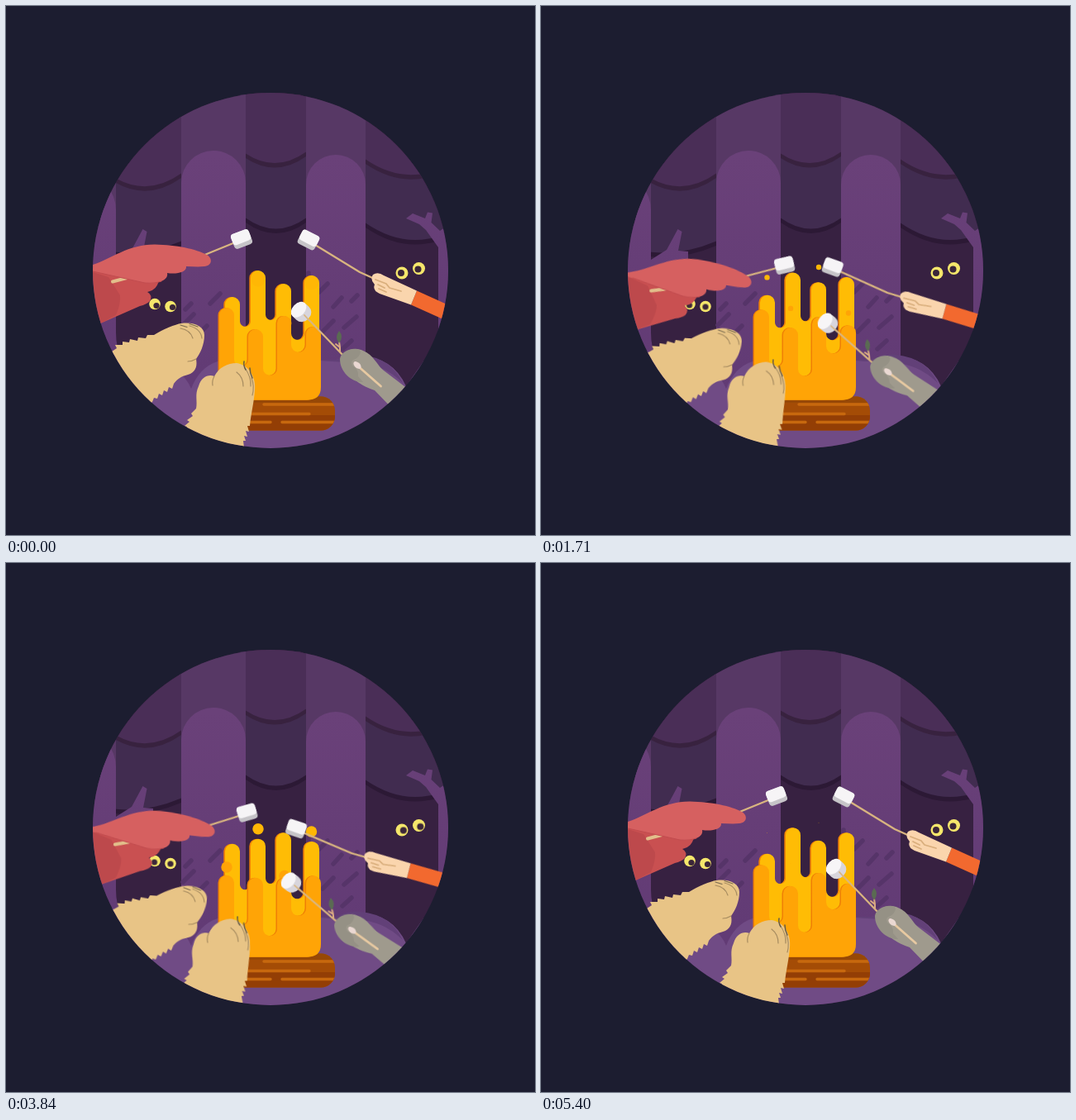
Write an HTML page that moves like this. It is 640x640 px and loops after 5430 ms.

```html
<!DOCTYPE html>
<html lang="en">
<head>
<meta charset="utf-8">
<title>Campfire</title>
<style>
html, body { margin: 0; width: 100%; height: 100%; overflow: hidden; background: #1c1d30; }
svg { display: block; width: 100%; height: 100%; }

.swing { animation: 5430ms cubic-bezier(.37, 0, .63, 1) infinite; }
#red { transform-origin: 46px 372px; animation-name: red; }
#human { transform-origin: 622px 405px; animation-name: human; }
#grey { transform-origin: 524px 505px; animation-name: grey; }
@keyframes red { 38.67%, 47.33% { transform: rotate(8.1deg); } }
@keyframes human { 41.99%, 69.43% { transform: rotate(-8.4deg); } }
@keyframes grey {
  0%, 8.84%, 98.9%, 100% { transform: rotate(0deg); }
  47.7%, 57.09% { transform: rotate(-7.2deg); }
}

.paw { animation: paw 1357.5ms cubic-bezier(.37, 0, .63, 1) infinite alternate; }
#bigPaw { --turn: 4deg; transform-origin: 110px 450px; }
#smallPaw { --turn: -3.7deg; transform-origin: 250px 560px; }
@keyframes paw { to { transform: rotate(var(--turn)); } }

.look { animation: 5430ms ease-in-out infinite; }
#lookLeft { animation-name: lookLeft; }
#lookRight { animation-name: lookRight; }
@keyframes lookLeft {
  0%, 23%, 98%, 100% { transform: translate(2px, 1px); }
  27%, 94% { transform: translate(-.5px, .5px); }
}
@keyframes lookRight {
  0%, 61%, 96%, 100% { transform: translate(-1px, 0); }
  65%, 92% { transform: translate(1.8px, .5px); }
}
.line { fill: none; stroke-linecap: round; stroke-linejoin: round; }
.stick { stroke: #d9b57f; stroke-width: 2.2; }
</style>
</head>
<body>
<svg viewBox="0 0 640 640">
  <defs>
    <clipPath id="porthole"><circle cx="320" cy="320" r="215"/></clipPath>
    <linearGradient id="bark" gradientUnits="userSpaceOnUse" x1="0" y1="180" x2="0" y2="440">
      <stop stop-color="#6a4179"/><stop offset="1" stop-color="#623b75"/>
    </linearGradient>
    <clipPath id="logShape"><rect x="240" y="472.500" width="158" height="41" rx="17"/></clipPath>
    <g id="mallow">
      <rect x="-11.500" y="-9.500" width="23" height="19" rx="4" fill="#c6c4c8"/>
      <rect x="-11.500" y="-9.500" width="23" height="14" rx="4" fill="#f6f4f6"/>
    </g>
  </defs>

  <rect width="640" height="640" fill="#1c1d30"/>
  <g clip-path="url(#porthole)">
    <rect x="105" y="105" width="430" height="430" fill="#372141"/>
    <g id="leaves"></g>

    <!-- trunks -->
    <path fill="#573865" d="M212 100H290V260H212ZM363 100H435V260H363ZM90 100H133V260H90Z"/>
    <g fill="url(#bark)">
      <path d="M212 480V214A39 39 0 0 1 290 214V480Z"/>
      <path d="M363 480V216A36 36 0 0 1 435 216V480Z"/>
      <path d="M55 480V247A39 42 0 0 1 133 247V395Q133 415 140 425V480Z"/>
      <path d="M133 307L152 295L165.500 270L170.500 273L166 296L178 297V306L133 330Z"/>
      <path d="M523 292L508 271L500 264L484 257L492 251L507 257L510 249.500L516 250.500L514.500 262L525 272L540 262V470H484Q523 425 523 390Z"/>
    </g>
    <path class="line" stroke="#563469" stroke-width="5.500"
      d="M247 360L259 348M217 367L224 360M214 386L227 373M232 398L243 387M214 407L222 400M366 346V323M379 346L389 336M396 364L406 353M418 357L425 350M383 394L396 381M409 389L424 376M407 415L418 405M366 372L376 362"/>

    <path fill="#704b85" d="M90 415L135 418L205 440Q219 450 224 463Q236 432 265 428H400Q462 412 484 460L505 430L540 420V540H90Z"/>
    <path fill="#624078" d="M363 428H400Q415 420 430 422Q466 426 480 456Q455 432 425 432Z"/>

    <!-- watching eyes -->
    <g fill="#f5e76b">
      <circle cx="180" cy="360.500" r="6.800"/><circle cx="199" cy="363.500" r="6.800"/>
      <circle cx="479" cy="323" r="7.500"/><circle cx="499.500" cy="317.500" r="7.500"/>
    </g>
    <g fill="#3b2639">
      <g id="lookLeft" class="look"><circle cx="180" cy="361.500" r="3.600"/><circle cx="199.500" cy="363.500" r="3.600"/></g>
      <g id="lookRight" class="look"><circle cx="479" cy="323" r="4"/><circle cx="499.500" cy="318.500" r="4"/></g>
    </g>

    <!-- log -->
    <g clip-path="url(#logShape)">
      <path fill="#a44c06" d="M240 472H400V515H240Z"/>
      <path fill="#974806" d="M240 472H400V480H240Z"/>
      <path fill="#933e05" d="M240 495H400V515H240Z"/>
      <path class="line" stroke="#c7680e" stroke-width="3.400" d="M312 482H400M280 493.500H367M280 503.500H320M334 503.500H400"/>
    </g>

    <!-- fire -->
    <path id="backEdge" fill="#f08206" transform="translate(-.7)"/>
    <path id="back" fill="#ffbc05" transform="translate(1)"/>
    <g id="sparks"></g>
    <path id="frontEdge" fill="#ef7f06" transform="translate(-1.500)"/>
    <path id="front" fill="#ffa406"/>

    <!-- red hand -->
    <g id="red" class="swing">
      <path class="line stick" d="M238 302L276 286.500"/>
      <use href="#mallow" transform="translate(285 282) rotate(-21)"/>
      <path fill="#c95051" d="M80 314L185 330Q184 343 171 346Q178 350 174 357Q170 361 162 363L112 385L80 395Z"/>
      <path fill="#bd494c" d="M80 314L124 328L138 350Q139 360 133 374L112 385L80 395Z"/>
      <path class="line" stroke="#e2bf8b" stroke-width="4" d="M129 333.500L146 329"/>
      <path fill="#d66060" d="M80 321L105 313C130 305 146 289 180 288.500C206 289 230 294 243 301C250 305 250 314 240 315C232 316 225 315 218 315C219 322 206 325 195 323C197 332 183 337 168 335L105 321L80 318Z"/>
      <path class="line" stroke="#c24c4f" stroke-width="1" d="M105 321L168 335Q180 336 188 333"/>
    </g>

    <!-- human hand -->
    <g id="human" class="swing">
      <path class="line stick" d="M374 289L428 322L448 331"/>
      <use href="#mallow" transform="translate(366 283) rotate(27)"/>
      <path fill="#f2692f" d="M497 344.500L550 368.500V388.500L490 361.500Z"/>
      <path fill="#fad5ad" d="M444 325Q450 321 457 326L497 344.500L490 361.500L452 348Q443 344 446 337Q440 331 444 325Z"/>
      <path class="line" stroke="#d9ae7c" stroke-width="1.800" d="M447 331L460 336L464 341L478 345M450 337L458 341M451 342L460 346"/>
    </g>

    <!-- grey hand -->
    <g id="grey" class="swing">
      <path class="line stick" d="M361 374L411 426"/>
      <g transform="translate(357 370) rotate(43)">
        <rect x="-11" y="-11" width="23" height="22" rx="9.500" fill="#d8d5dc"/>
        <ellipse cx="-4" rx="7.500" ry="11" fill="#f7f5f7"/>
      </g>
      <path class="line" stroke="#d9b57f" stroke-width="1.800" d="M361 374L367 380.500"/>
      <path class="line" stroke="#d9a982" stroke-width="2" d="M399 409L404 413L403 406M404 413V418"/>
      <path fill="#5a6b52" d="M403 393Q409 400 403 408Q397 401 403 393Z"/>
      <path fill="#9f9a8d" d="M405 427C407 417 421 412 432 417C445 422 449 435 457 441L495 470L475 495L446 465C432 460 414 452 405 427Z"/>
      <path fill="#959185" d="M404 427C405 418 419 412 428 416Q431 421 423 427Q416 428 419 435Q427 440 426 448L432 455C420 456 404 444 404 427Z"/>
      <path class="line" stroke="#e7c9a1" stroke-width="2.800" d="M424 434L453.500 460"/>
      <ellipse cx="425" cy="434.500" rx="5.500" ry="3.300" transform="rotate(43 425 434.500)" fill="#ead8d2"/>
    </g>

    <!-- furry paws -->
    <g id="bigPaw" class="paw">
      <path fill="#e8c486" d="M95 436L128 418l6-4l-2-4h9v-4l8 1l1-4l9 2l1-4l9 1l2-4h8C190 391 205 385 212 384C228 382 240 388 240 398C240 410 235 420 230 427C232 438 228 445 217 447C210 449 206 453 203 457l-2 6l-4-2l-2 6l-4-2l-2 6l-4-2l-2 6l-4-1l-2 5L150 500L95 480Z"/>
      <path class="line" stroke="#a78c60" stroke-width="1.200" d="M211 390Q223 392 226 402M222 387Q236 391 237 402M230 427Q225 430 220 430"/>
      <path class="line" stroke="#7b6c50" stroke-width="1.200" d="M211 386L219 388.500M222 384.500L232 388"/>
    </g>
    <g id="smallPaw" class="paw">
      <path fill="#e8c486" d="M205 540L219 509l-3-1l6-5l-3-2l7-5l-2-3l6-6C232 478 228 470 233 460C236 449 245 445 252 448C258 437 268 432 279 432C294 434 303 450 301 465C300 480 296 495 295 508h-3l2 7l-4-1l2 7l-4-1l2 6h-3l1 8L285 560H205Z"/>
      <path class="line" stroke="#a78c60" stroke-width="1.200" d="M252 448Q249 453 250 459M279 443Q287 449 287 460M289 438Q297 449 296 460M297 450Q301 460 298 471"/>
      <path class="line" stroke="#655a45" stroke-width="1.500" d="M288 430Q287 435 290 440M295 438Q295 444 298 450"/>
    </g>
  </g>
</svg>

<script>
const $ = id => document.getElementById(id);
const NS = "http://www.w3.org/2000/svg";

function add(parent, tag, attrs) {
  const el = document.createElementNS(NS, tag);
  for (const k in attrs) el.setAttribute(k, attrs[k]);
  return parent.appendChild(el);
}

// Foliage: left x, left y, right x, right y, curve control y
function scallop([x1, y1, x2, y2, c], fill, shade) {
  const path = up => `M${x1} 100V${y1 - up}Q${(x1 + x2) / 2} ${c - up} ${x2} ${y2 - up}V100Z`;
  add($("leaves"), "path", { d: path(0), fill: shade });
  add($("leaves"), "path", { d: path(5.5), fill });
}
for (const s of [[105, 298, 212, 290, 313], [290, 262, 363, 262, 288], [435, 268, 540, 277, 304]])
  scallop(s, "#412c50", "#2c1935");
for (const s of [[133, 214, 212, 208, 236], [290, 184, 363, 182, 208], [435, 191, 535, 197, 225]])
  scallop(s, "#4a2e57", "#38223f");

// Each tongue: left, right, top, top travel, then the notch after it: bottom, travel
const backTongues = [
  [264, 282, 352, -19.5, 388, 12], [295, 313, 320, 22, 380, 13],
  [326, 344, 336, -15.5, 404, 4], [360, 378, 326, 17.5]
];
const frontTongues = [
  [258, 276, 365, 20.5, 436, 5], [293, 311, 391, -16.5, 447, 7],
  [328, 345, 375, 10, 419, 12.5], [363, 381, 388, -15.5]
];

function flame(tongues, k) {
  const left = tongues[0][0];
  let d = `M${left} 465`;
  tongues.forEach(([a, b, top, move, notch, drop], i) => {
    const r = (b - a) / 2;
    d += `V${top + move * k + r}A${r} ${r} 0 0 1 ${b} ${top + move * k + r}`;
    const next = tongues[i + 1];
    if (!next) return;
    const n = (next[0] - b) / 2, y = notch + drop * k - n;
    d += `V${y}A${n} ${n} 0 0 0 ${next[0]} ${y}`;
  });
  return d + `V461Q${tongues[3][1]} 476.500 ${tongues[3][1] - 16} 476.500H${left + 12}Q${left} 476.500 ${left} 465Z`;
}

// Sparks: x, start y, end y, phase of release
const BACK = "#ffb705", FRONT = "#ffa406";
const sparks = [
  [273.5, 339, 326.5, .5, BACK], [336, 327.5, 314, .5, BACK],
  [305, 331, 314, 0, BACK], [369.5, 335, 316.5, 0, BACK],
  [302, 382, 363, .5, FRONT], [372, 380, 370, .5, FRONT],
  [267, 374, 363, 0, FRONT], [337, 384, 374, 0, FRONT]
].map(([x, from, to, start, fill]) =>
  ({ from, to, start, el: add($("sparks"), "circle", { cx: x, fill }) }));

const FLICKER = 905, RISE = .42, HOLD = .5;
const ease = u => (1 - Math.cos(u * Math.PI)) / 2;
let begin;

function draw(now) {
  begin ??= now;
  const phase = (now - begin) / FLICKER % 1;
  const k = phase < HOLD ? ease(Math.min(phase / RISE, 1)) : 1 - ease((phase - HOLD) / (1 - HOLD));
  const back = flame(backTongues, k), front = flame(frontTongues, k);
  $("back").setAttribute("d", back);
  $("backEdge").setAttribute("d", back);
  $("front").setAttribute("d", front);
  $("frontEdge").setAttribute("d", front);
  for (const { from, to, start, el } of sparks) {
    const u = (phase - start + 1) % 1 / .475;
    const live = u < 1;
    el.setAttribute("r", live ? 8.4 * (1 - u ** 2.4) : 0);
    if (live) el.setAttribute("cy", to + (from - to) * (1 - u) ** 1.1);
  }
  requestAnimationFrame(draw);
}
requestAnimationFrame(draw);
</script>
</body>
</html>
```
